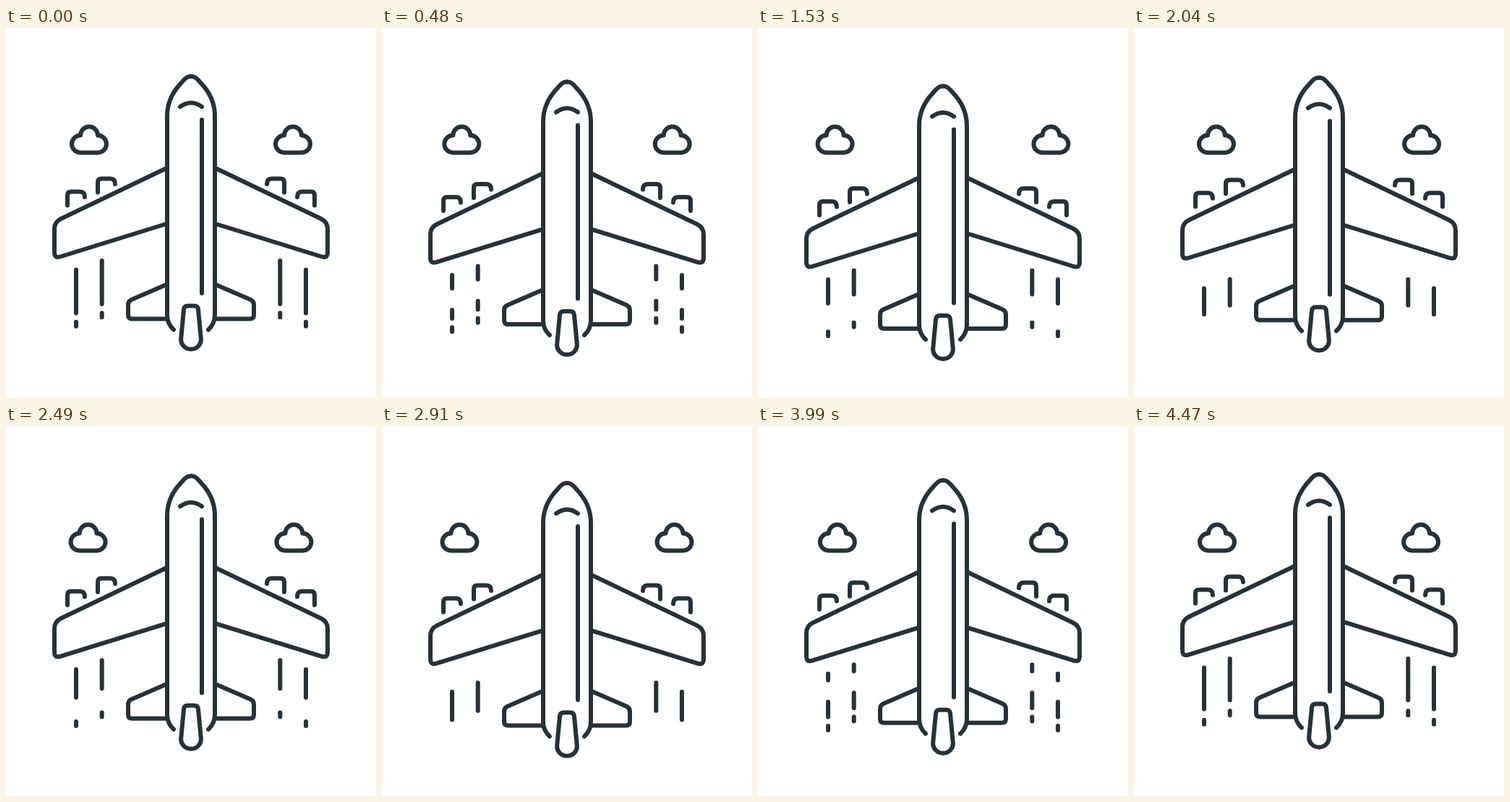
Animation of 512 by 512 pixels, one loop 4.5 s. Source, as an HTML page:

```html
<!DOCTYPE html>
<html lang="en">
<head>
<meta charset="utf-8">
<title>Airplane</title>
<style>
  html, body { margin: 0; width: 100%; height: 100%; overflow: hidden; background: #fff; }
  svg { display: block; width: 100%; height: 100%; }
  svg { fill: none; stroke: #263238; stroke-width: 6; stroke-linecap: round; stroke-linejoin: round; }
  .trail { stroke-dasharray: 60 30; }
</style>
</head>
<body>
<svg viewBox="0 0 512 512">
  <defs>
    <path id="cloud" d="M103 172.5A12 12 0 0 1 103 148.5A12 12 0 0 1 127 148.5A12 12 0 0 1 127 172.5Z"/>
    <path id="engine" d="M85 245.5V231.5Q85 226.5 90 226.5H102.500Q109 226.500 109 234"/>
    <g id="side">
      <path d="M232 417.500C226 412 223 405 223 397V122C223 105 229 92 238 81L246 72C251.500 66 254 67 256 67"/>
      <path d="M222 194L76 264Q67 268.500 67 278V310.500Q67 319 75 316.500L222 271"/>
      <path d="M222 355L173.500 376Q169 378 169 383V397Q169 402.500 174.500 402.500H222"/>
      <use href="#engine"/>
      <use href="#engine" x="42" y="-18"/>
      <path class="trail" d="M97 334.500v60M97 406.700v6"/>
      <path class="trail" d="M132.700 322v60M132.700 394.200v6"/>
    </g>
  </defs>
  <use class="cloud" href="#cloud"/>
  <g transform="matrix(-1 0 0 1 512 0)"><use class="cloud" href="#cloud"/></g>
  <g id="plane">
    <use href="#side"/>
    <use href="#side" transform="matrix(-1 0 0 1 512 0)"/>
    <path d="M241 109Q256 98 271 109M271 127V367"/>
    <path d="M251.500 384.500H260.500Q265.500 384.500 266 389.500L269.800 430C270.500 438 264 444.500 256 444.500S241.500 438 242.200 430L246 389.500Q246.500 384.500 251.500 384.500Z"/>
  </g>
</svg>
<script>
  const SWAY = 2250, TRAIL = 900;
  const plane = document.getElementById('plane');
  const clouds = document.querySelectorAll('.cloud');
  const trails = document.querySelectorAll('.trail');
  const ease = x => x * x * (3 - 2 * x);

  function draw(time) {
    const phase = time % SWAY / SWAY;
    const sway = ease(1 - Math.abs(1 - 2 * phase));
    plane.setAttribute('transform', `translate(0 ${19.2 * sway})`);
    clouds.forEach(cloud => cloud.setAttribute('x', -12 * sway));

    // The dash pattern restarts on each segment, so both wipe downwards together.
    const shift = 90 * (time % TRAIL) / TRAIL;
    trails.forEach(trail => trail.style.strokeDashoffset = -shift);
  }

  function tick() {
    draw(performance.now());
    requestAnimationFrame(tick);
  }
  tick();
</script>
</body>
</html>
```
